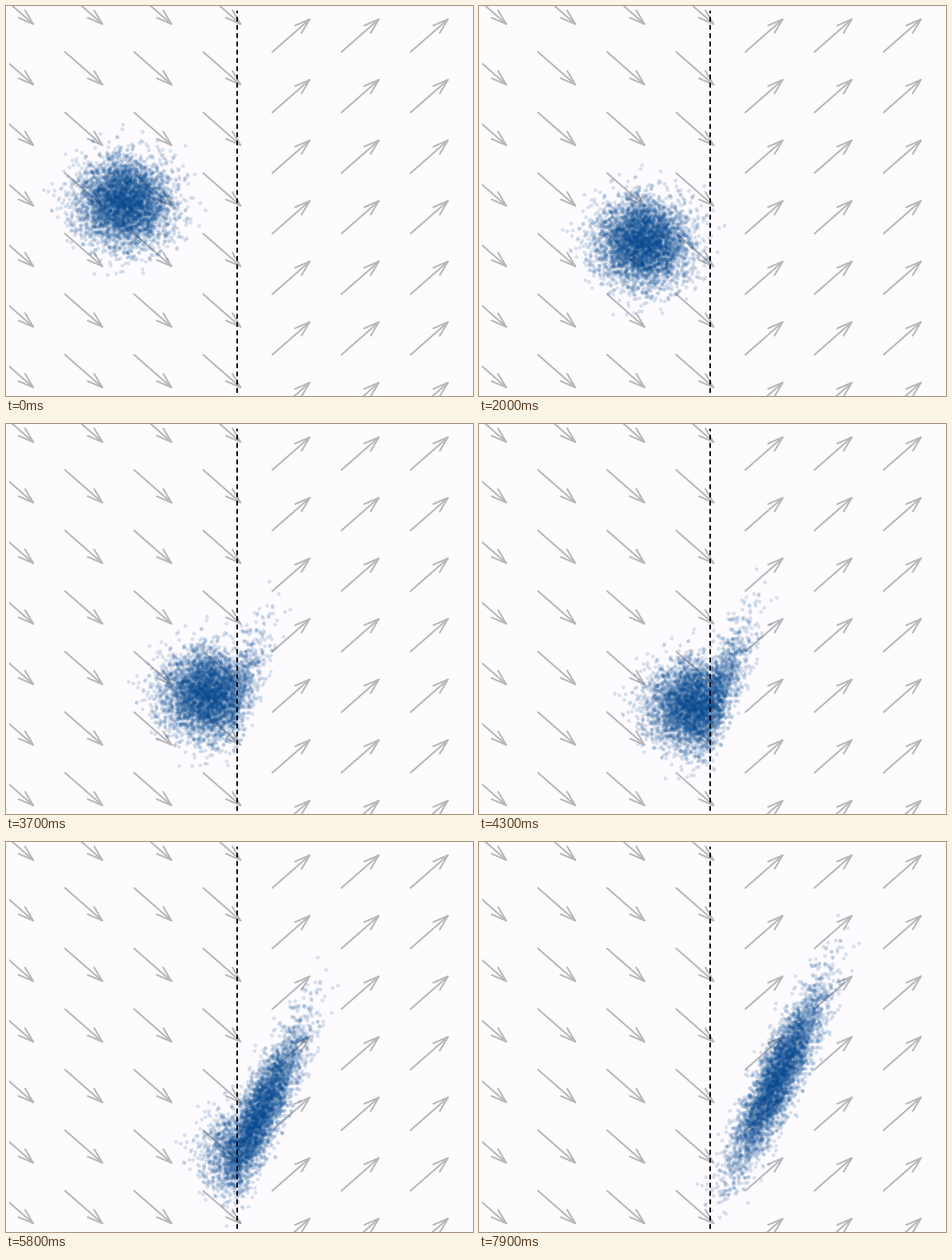
A matplotlib script that plays this animation: 600x501 px, repeating every 8000 ms.

```python
import numpy as np
import matplotlib.pyplot as plt
from matplotlib.animation import FuncAnimation
from matplotlib.collections import LineCollection
from matplotlib.patches import Rectangle

W, H, DPI = 600, 501, 64
PT = 72 / DPI                      # points per pixel
FRAMES, STEP_MS = 80, 100
WALL = 297                         # the flow turns upward past this x
VX, VY = 2.928, 2.565              # pixels per frame
CENTER, SIGMA = (152, 253), (30, 28.5)
COUNT, REACH = 4500, 3.7           # particles, cut-off in sigmas


def make_cloud():
    rng = np.random.default_rng(7)
    z = rng.standard_normal((COUNT, 2))
    z = z[np.hypot(*z.T) < REACH]
    return np.array(CENTER) + np.array(SIGMA) * z


def positions(t):
    """Drift down to the wall, then up with the mirrored velocity."""
    x0, y0 = start.T
    hit = (WALL - x0) / VX
    return np.column_stack([x0 + VX * t, y0 + VY * (hit - np.abs(t - hit))])


def arrow(x, y, sign, head=19.5, half=6.3):
    """Open arrow from a tail point: shaft and a two-barb head."""
    shaft = np.array([48, 42 * sign])
    tip = np.array([x, y]) + shaft
    u = shaft / np.hypot(*shaft)
    n = np.array([-u[1], u[0]])
    back = tip - head * u
    return [[(x, y), tip], [back + half * n, tip, back - half * n]]


fig = plt.figure(figsize=(W / DPI, H / DPI), dpi=DPI, facecolor="#fdfbfe")
ax = fig.add_axes([0, 0, 1, 1])
ax.set(xlim=(0, W), ylim=(H, 0))
ax.axis("off")

lines = []
for col in range(7):
    for row in range(8):
        x, y = -13 + 88.8 * col, -18.8 + 77.8 * row
        lines += arrow(x, y, 1 if col < 4 else -1)
arrows = LineCollection(lines, colors="#b8b7b9", linewidths=2.2 * PT,
                        capstyle="round", zorder=1)
ax.add_collection(arrows)
arrows.set_clip_path(Rectangle((4, 0), W - 4, H, transform=ax.transData))

start = make_cloud()
dots = ax.scatter(*start.T, s=(4.9 * PT) ** 2, color="#084a91", alpha=0.15,
                  linewidths=0, zorder=2)
ax.plot([WALL, WALL], [497, 6], color="black", lw=2 * PT,
        ls=(0, (3.1, 2.2)), dash_capstyle="butt", zorder=3)


def update(i):
    dots.set_offsets(positions(i))
    return dots,


anim = FuncAnimation(fig, update, frames=FRAMES, interval=STEP_MS,
                     repeat=True, repeat_delay=0)
plt.show()
```
